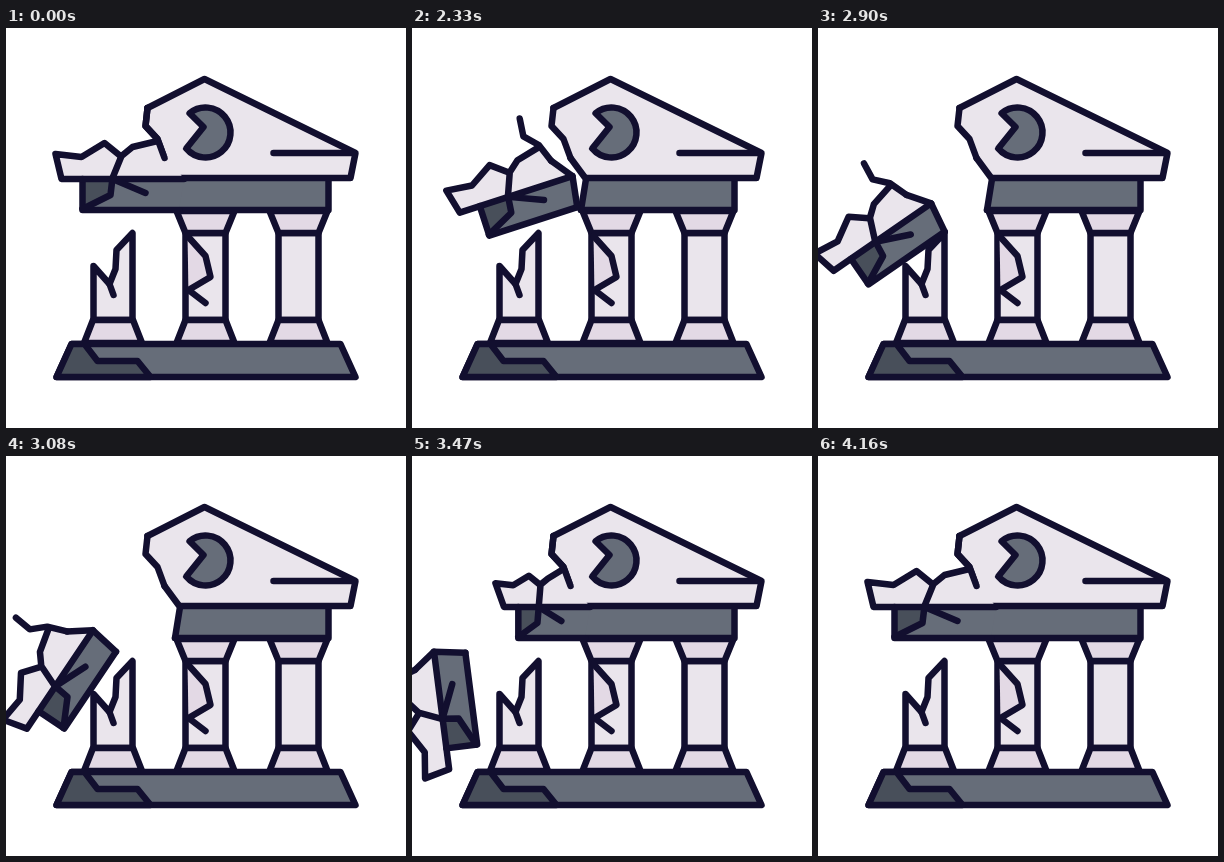
These frames come from a looping animation (400x400 px, 4.64 s). An HTML page with a canvas:

```html
<!DOCTYPE html>
<html lang="en">
<head>
<meta charset="utf-8">
<title>Crumbling temple</title>
<style>
  html, body { margin: 0; width: 100%; height: 100%; overflow: hidden; background: #fff; }
  canvas { display: block; }
</style>
</head>
<body>
<canvas id="stage" width="400" height="400"></canvas>
<script>
const ctx = document.getElementById('stage').getContext('2d');
const INK = '#120f2f', LIGHT = '#eae5ec', SHADE = '#e3d9e5', STONE = '#666d79', DARK = '#484f5a';
const LOOP = 4640, BREAK = 2030, REGROW = 3095, GONE = 4160;

// Cracks shared by the roof and the chunk that breaks off
const RIFT = [142, 80, 140, 98, 152, 111, 159, 130];
const SEAM = [159, 130, 174.5, 151, 169.5, 182];

const same = (x, y) => [x, y];
const ramp = (t, from, to) => Math.min(1, Math.max(0, (t - from) / (to - from)));

function trace(points, map = same) {
  ctx.beginPath();
  for (let i = 0; i < points.length; i += 2) ctx.lineTo(...map(points[i], points[i + 1]));
}

function fill(color, points, map) {
  trace(points, map);
  ctx.fillStyle = color;
  ctx.fill();
}

function line(points, map) {
  trace(points, map);
  ctx.stroke();
}

function shape(color, points) {
  fill(color, points);
  ctx.closePath();
  ctx.stroke();
}

// Symmetric block around x: half width at the top, half width at the bottom
function block(color, x, top, topHalf, bottom, bottomHalf) {
  shape(color, [x - topHalf, top, x + topHalf, top, x + bottomHalf, bottom, x - bottomHalf, bottom]);
}

const foot = x => block(SHADE, x, 292, 20, 315, 29);

function drawBase() {
  shape(LIGHT, [88, 292, 88, 238, 104, 256, 110, 241, 111, 222, 127, 205, 127, 292]);
  line([104, 256, 108, 267]);
  foot(107.5);

  for (const x of [200, 293]) {
    block(LIGHT, x, 205, 20, 292, 20);
    block(SHADE, x, 183, 29, 205, 20);
    foot(x);
  }
  const split = [182, 208, 200, 228, 205, 249, 183, 262];
  fill(SHADE, split);
  line([...split, 200, 275]);

  block(STONE, 200.5, 316, 134.5, 349, 149.5);
  shape(DARK, [66, 316, 79, 316, 92, 333, 132, 333, 145, 349, 51, 349]);
}

function drawRoof(whole) {
  const rim = [...RIFT.slice(0, 2), 199, 51, 350, 125, 345, 150, 174.5, 150];
  const beam = [174.5, 151, 323, 151, 323, 182, 169.5, 182];
  fill(STONE, beam);
  fill(LIGHT, [...rim, 159, 130, 152, 111, 140, 98]);
  line(beam.slice(2));
  line(rim);
  line(RIFT);
  if (!whole) line(SEAM);
  line([268, 125, 348, 125]);

  ctx.beginPath();
  ctx.arc(200, 104.5, 25, -2.26, 2.45);
  ctx.lineTo(198, 99);
  ctx.closePath();
  ctx.fillStyle = STONE;
  ctx.fill();
  ctx.stroke();
}

function drawChunk(loose, map) {
  const overlap = loose ? 0 : 4;
  const top = [56, 151, 50, 126, 76, 129, 99, 115, 115, 128];
  const crack = [152, 113, 127, 119, 116, 128, 107, 150, 105, 167, 77, 181];
  fill(STONE, [77, 151, 174.5 + overlap, 151, 169.5 + overlap, 182, 77, 182], map);
  fill(DARK, [77, 151, 107, 151, 105, 167, 77, 181], map);
  fill(LIGHT, [...top, 127, 119, 152, 113, 159 + overlap, 130, 174.5 + overlap, 151], map);
  line([169.5 + overlap, 182, 77, 182, 77, 151], map);
  line([174.5 + overlap, 151, ...top], map);
  line(crack, map);
  line([107, 151, 140, 165], map);
  line(RIFT);
  if (loose) line(SEAM);
}

// Pulls the missing part towards the break, growth 0 to 1
const stretch = growth => (x, y) => {
  if (x > 150) return [x, y];
  const upper = y < 140, edgeX = upper ? 157 : 171, edgeY = upper ? 130 : y;
  return [edgeX + (x - edgeX) * growth, edgeY + (y - edgeY) * growth];
};

// The chunk tips over, slides off the stump, then rolls away
function drawFall(t) {
  const tip = ramp(t, 0, 600) ** 1.3;
  const slide = ramp(t, 600, 870);
  const drop = ramp(t, 870, 1710);
  const roll = (Math.max(0, t - 870) / 840) ** 0.93;
  const away = Math.max(0, roll - 1);
  const turn = 30 * Math.sin(tip * Math.PI / 2) + 4.5 * slide + 90 * roll;
  ctx.save();
  ctx.translate(112.5 - 34 * tip - 22 * slide - 53 * roll - 100 * away, 140 + 41 * tip + 20.5 * slide + 84 * drop);
  ctx.rotate(-turn * Math.PI / 180);
  ctx.translate(-112.5, -140);
  drawChunk(true);
  ctx.restore();
}

function draw(t) {
  const whole = t < BREAK || t >= REGROW;
  ctx.setTransform(1, 0, 0, 1, 0, 0);
  ctx.clearRect(0, 0, 400, 400);
  ctx.translate(-0.5, 0);
  ctx.lineWidth = 6.5;
  ctx.lineCap = ctx.lineJoin = 'round';
  ctx.strokeStyle = INK;
  drawBase();
  drawRoof(whole);
  if (whole) {
    const missing = t < BREAK ? 0 : 1 - ramp(t, REGROW, REGROW + 750);
    drawChunk(false, stretch(1 - missing ** 1.65));
  }
  if (t >= BREAK && t < GONE) drawFall(t - BREAK);
}

const start = performance.now();
function tick() {
  draw((performance.now() - start) % LOOP);
  requestAnimationFrame(tick);
}
tick();
</script>
</body>
</html>
```
